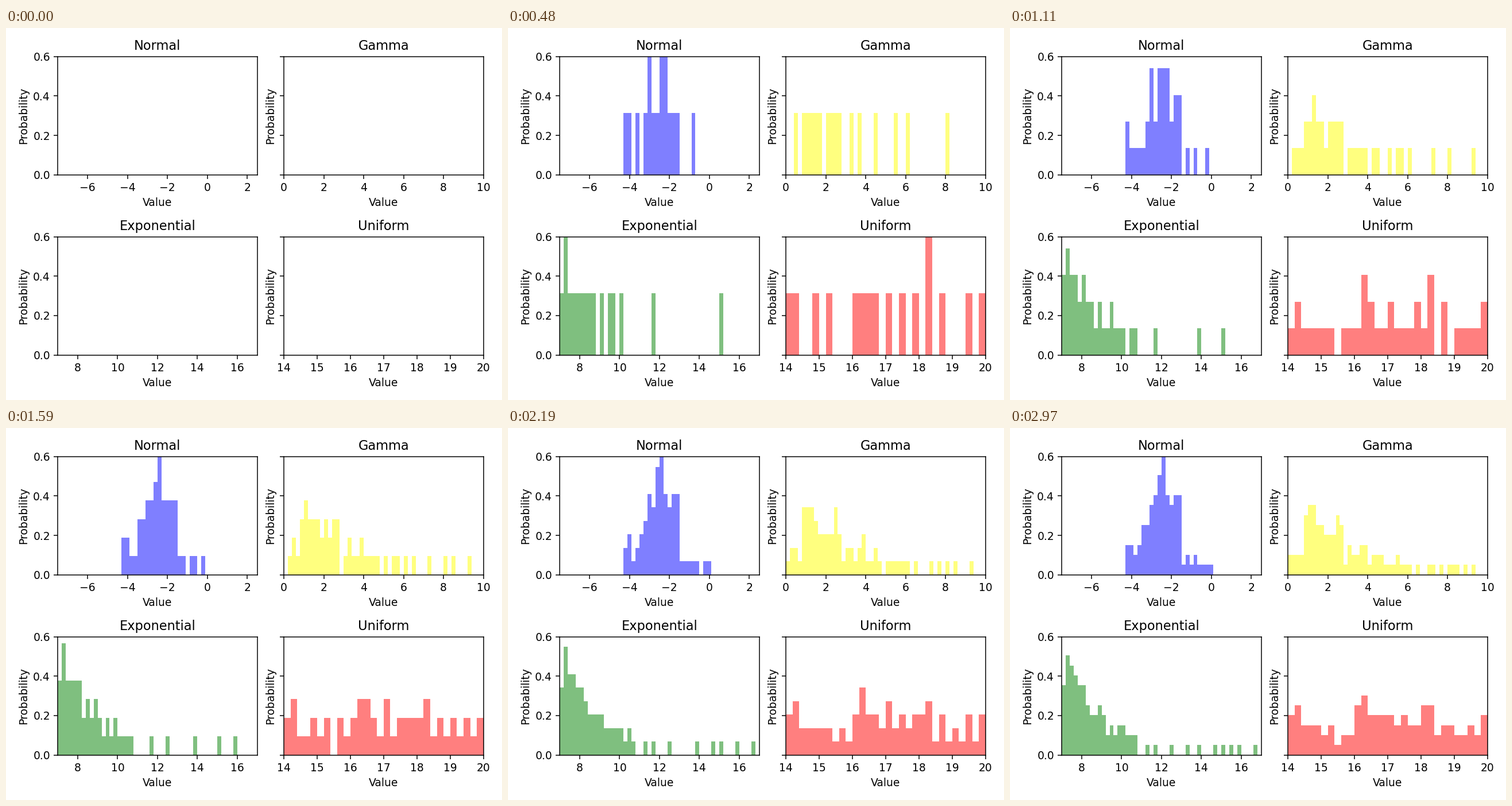
These frames come from a looping animation (864 by 648 pixels, 3000 ms). A matplotlib script:

```python
import matplotlib.pyplot as plt
import numpy as np
from matplotlib.animation import FuncAnimation

WIDTH, HEIGHT, DPI = 864, 648, 135
FRAMES, INTERVAL = 100, 30
STEP = 0.2
GOLDEN = (5 ** 0.5 - 1) / 2

# Title, colour, x limits and the deciles that shape the distribution.
PANELS = [
    ("Normal", "blue", (-7.5, 2.5),
     [-4.3, -3.5, -3.14, -2.81, -2.61, -2.45, -2.27, -1.98, -1.74, -1.5, 0.1]),
    ("Gamma", "yellow", (0, 10),
     [0, 0.9, 1.14, 1.47, 1.86, 2.37, 2.7, 3.53, 4.35, 6, 9.5]),
    ("Exponential", "green", (7, 17),
     [7, 7.28, 7.46, 7.67, 7.95, 8.25, 8.75, 9.12, 9.95, 10.71, 16.8]),
    ("Uniform", "red", (14, 20),
     [14, 14.4, 15.03, 16.04, 16.39, 16.9, 17.38, 18.01, 18.45, 19.27, 20]),
]


def draw_samples(deciles, phase):
    """Evenly scattered draws, mapped through the quantile curve."""
    u = (phase + GOLDEN * np.arange(FRAMES)) % 1
    return np.interp(u, np.linspace(0, 1, len(deciles)), deciles)


def density(samples, edges):
    counts, _ = np.histogram(samples, edges)
    return counts / (max(counts.sum(), 1) * STEP)


def place_axes(fig):
    left, right, top, bottom = 90.1, 831.7, 49.7, 569.6
    width, height = 347.6, 206
    fig.subplots_adjust(
        left=left / WIDTH, right=right / WIDTH,
        top=1 - top / HEIGHT, bottom=1 - bottom / HEIGHT,
        wspace=(right - left) / width - 2,
        hspace=(bottom - top) / height - 2)


fig, axes = plt.subplots(2, 2, sharey=True, dpi=DPI,
                         figsize=(WIDTH / DPI, HEIGHT / DPI))
place_axes(fig)

histograms = []
for i, (ax, panel) in enumerate(zip(axes.flat, PANELS)):
    title, color, (low, high), deciles = panel
    edges = np.linspace(low, high, round((high - low) / STEP) + 1)
    bars = ax.bar(edges[:-1], np.zeros(len(edges) - 1), STEP, align="edge",
                  color=color, alpha=0.5)
    ax.set(title=title, xlabel="Value", ylabel="Probability",
           xlim=(low, high), ylim=(0, 0.6))
    histograms.append((bars, edges, draw_samples(deciles, i / len(PANELS))))


def update(n):
    for bars, edges, samples in histograms:
        for bar, height in zip(bars, density(samples[:n], edges)):
            bar.set_height(height)
    return [bar for bars, _, _ in histograms for bar in bars]


anim = FuncAnimation(fig, update, frames=FRAMES, interval=INTERVAL,
                     repeat=True, repeat_delay=0)
plt.show()
```
